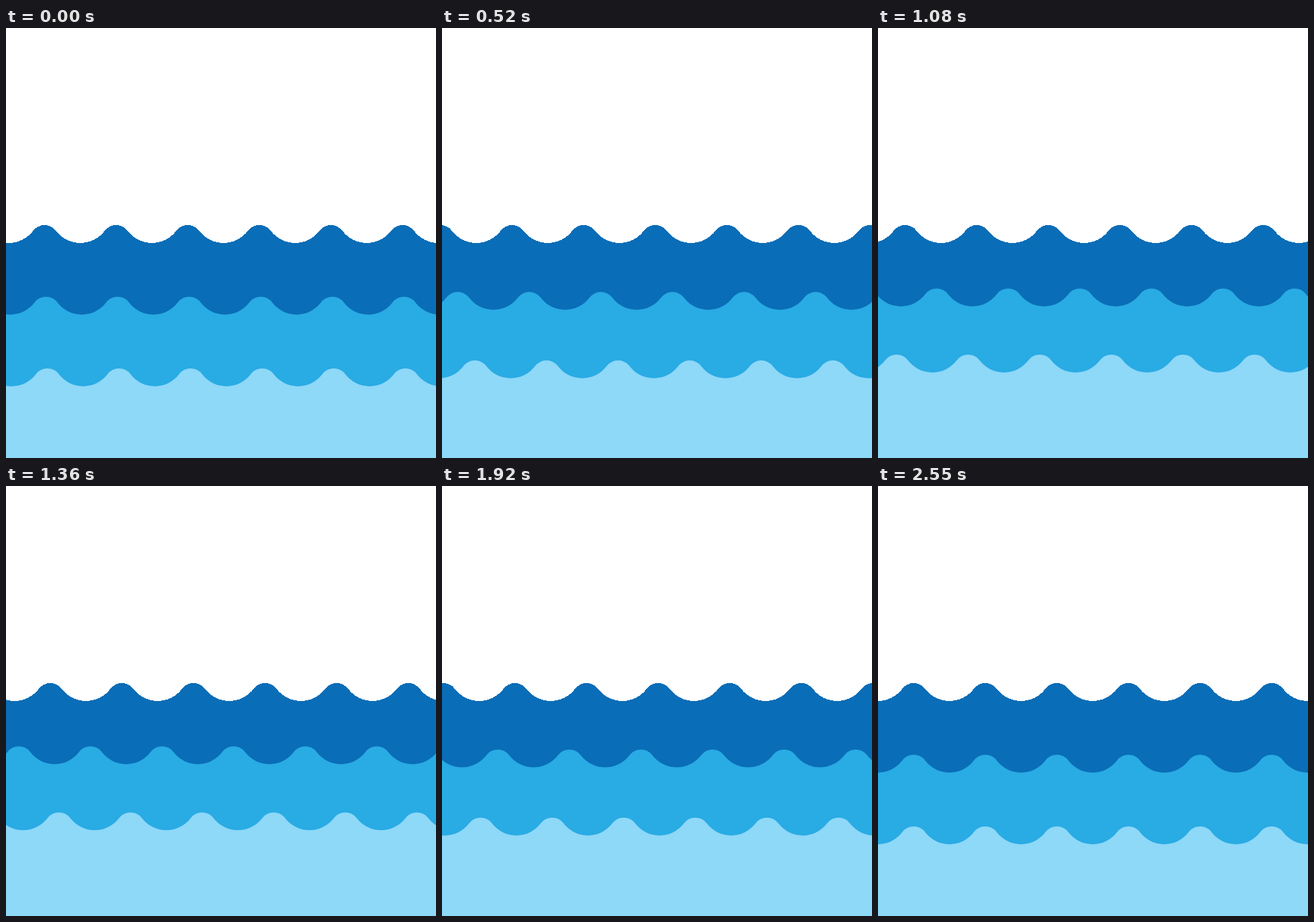
These frames come from a looping animation (600x600 px, 2.62 s). An HTML page:

```html
<!DOCTYPE html>
<html lang="en">
<head>
<meta charset="utf-8">
<title>Waves</title>
<style>
  html, body { margin: 0; width: 100%; height: 100%; overflow: hidden; background: #fff; }
  svg { display: block; width: 100%; height: 100%; }
</style>
</head>
<body>
<svg id="sea" viewBox="0 0 600 600"></svg>
<script>
  const LOOP = 2620, FIRST = 30, HOLD = 70, STEPS = 50, PERIOD = 99.9;
  const layers = [
    { y: 275, color: '#0a6db7', speed: 4, lift: 0, crisp: true },
    { y: 375, color: '#29abe4', speed: 6, lift: 12 },
    { y: 475, color: '#8ed8f8', speed: 8, lift: 20 }
  ];

  // Round crests (radius 20) joined smoothly to wide troughs (radius 42.5).
  function wavePath() {
    const half = PERIOD / 2 - 16;
    let d = 'M-216 8';
    for (let i = 0; i < 10; i++) {
      d += `a20 20 0 0 1 32 0a42.5 42.5 0 0 0 ${2 * half} 0`;
    }
    return d + 'V400H-216Z';
  }

  const sea = document.getElementById('sea');
  const shape = wavePath();
  for (const layer of layers) {
    const path = document.createElementNS(sea.namespaceURI, 'path');
    path.setAttribute('d', shape);
    path.setAttribute('fill', layer.color);
    if (layer.crisp) path.setAttribute('shape-rendering', 'crispEdges');
    layer.path = sea.appendChild(path);
  }

  // Straight start, soft top: 0 at both ends of the loop, 1 halfway.
  function rise(p) {
    const u = 1 - Math.abs(2 * p - 1);
    return u * (1 + u - u * u);
  }

  function draw(now) {
    const t = now % LOOP;
    const tick = t < FIRST ? 0 : 1 + Math.floor((t - FIRST) / HOLD);
    const step = Math.round(tick * 4 / 3);  // every fourth step is skipped
    for (const { path, y, speed, lift } of layers) {
      const x = 50 + (speed * (step + 1)) % 100;
      const dy = y - lift * rise(step / (STEPS - 1));
      path.setAttribute('transform', `translate(${x} ${dy.toFixed(2)})`);
    }
  }

  const start = performance.now();
  function frame() {
    draw(performance.now() - start);
    requestAnimationFrame(frame);
  }
  frame();
</script>
</body>
</html>
```
